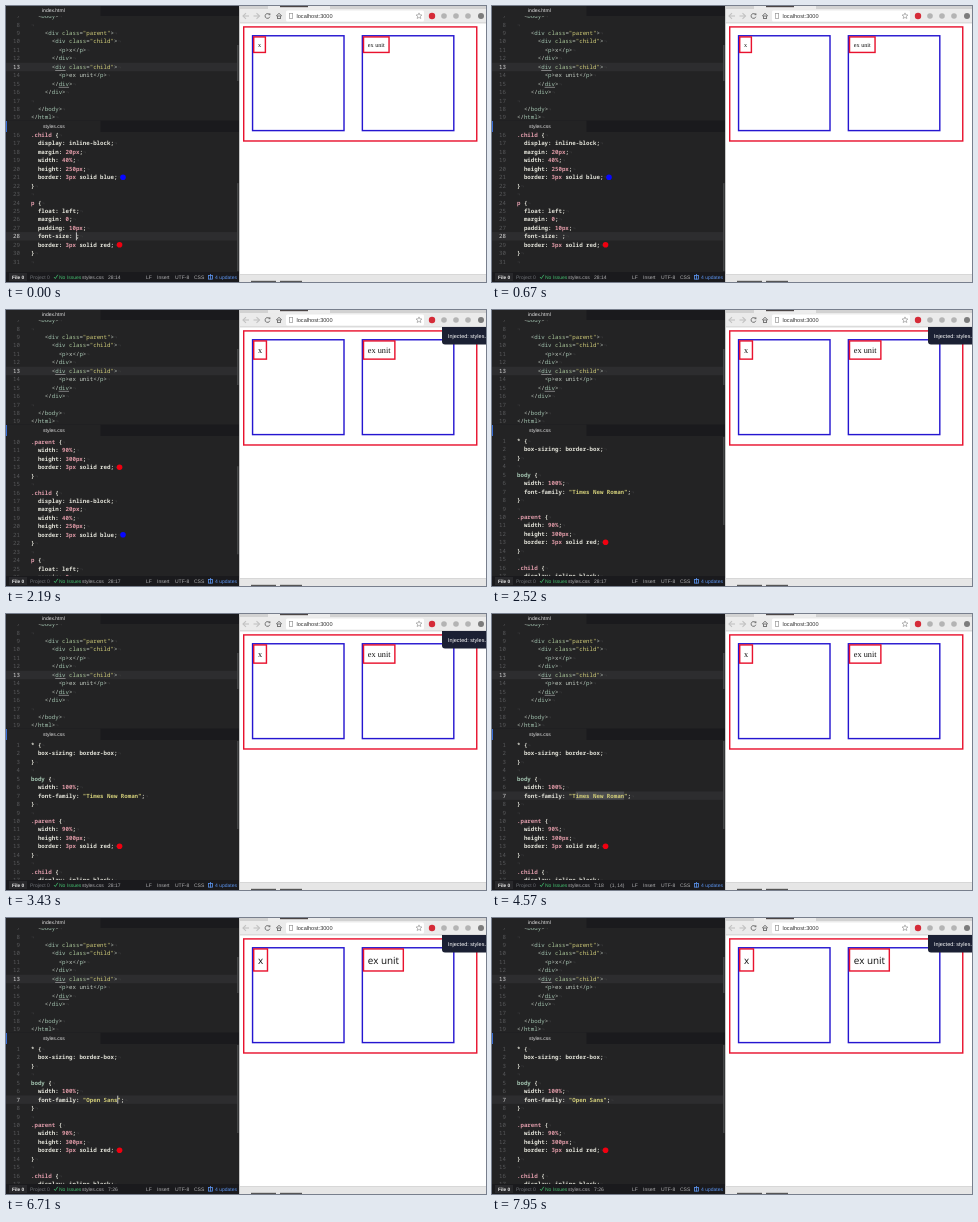
These frames come from a looping animation (480x276 px, 8 s). An HTML page with a canvas:

```html
<!DOCTYPE html>
<html lang="en">
<head>
<meta charset="utf-8">
<style>
  html, body { margin: 0; width: 100%; height: 100%; overflow: hidden; background: #232324; }
  canvas { display: block; width: 480px; height: 276px; }
</style>
</head>
<body>
<canvas width="480" height="276"></canvas>
<script>
const ctx = document.querySelector('canvas').getContext('2d');
ctx.textRendering = 'geometricPrecision';

const LOOP = 8000, ROW = 8.44, COL = 3.456, CODE_X = 25, GUTTER_RIGHT = 14;
const MONO = '5.76px "Noto Sans Mono", monospace';
const SANS = '"Liberation Sans", Arial, sans-serif';
const SERIF = '"Liberation Serif", "Times New Roman", serif';
const C = {
  editor: '#232324', bar: '#1a1a1d', line: '#2d2d2f', selection: '#4a4b4e',
  text: '#e2e2d8', dim: '#58595b', tag: '#a3c4b0', attr: '#a9c598',
  string: '#cfcb78', value: '#dc98a4', selector: '#dc9aa8',
  red: '#e8122e', blue: '#2516d0'
};

// Key moments in ms
const SIZE_KEYS = [700, 900, 1080], SIZE_SAVE = 1750, SIZE_INJECT = 1950;
const SCROLL = [2000, 2430], CLICK = 4150, DRAG = [4250, 4570];
const FONT_START = 4950, FONT_END = 5850, FONT_SAVE = 6150, FONT_INJECT = 6350;
const NOTICE_TIME = 2250;

const html = [
  '  <body>', '', '    <div class="parent">', '      <div class="child">',
  '        <p>x</p>', '      </div>', '      <div class="child">',
  '        <p>ex unit</p>', '      </div>', '    </div>', '', '  </body>', '</html>'
];

const css = (size, family) => `* {
  box-sizing: border-box;
}

body {
  width: 100%;
  font-family: "${family}";
}

.parent {
  width: 90%;
  height: 300px;
  border: 3px solid red;
}

.child {
  display: inline-block;
  margin: 20px;
  width: 40%;
  height: 250px;
  border: 3px solid blue;
}

p {
  float: left;
  margin: 0;
  padding: 10px;
  font-size: ${size};
  border: 3px solid red;
}
`.split('\n');

const clamp = v => Math.max(0, Math.min(1, v));
const progress = (t, [a, b]) => clamp((t - a) / (b - a));

function rect(x, y, w, h, color) {
  ctx.fillStyle = color;
  ctx.fillRect(x, y, w, h);
}

function frame(x, y, w, h, color, width) {
  ctx.strokeStyle = color;
  ctx.lineWidth = width;
  ctx.strokeRect(x + width / 2, y + width / 2, w - width, h - width);
}

function disc(x, y, r, color) {
  ctx.fillStyle = color;
  ctx.beginPath();
  ctx.arc(x, y, r, 0, 7);
  ctx.fill();
}

function rounded(x, y, w, h, radii, color) {
  ctx.fillStyle = color;
  ctx.beginPath();
  ctx.roundRect(x, y, w, h, radii);
  ctx.fill();
}

function stroke(color, width, ...points) {
  ctx.strokeStyle = color;
  ctx.lineWidth = width;
  ctx.beginPath();
  points.forEach(([x, y]) => ctx.lineTo(x, y));
  ctx.stroke();
}

function text(s, x, y, color, font = '5px ' + SANS) {
  ctx.font = font;
  ctx.fillStyle = color;
  ctx.fillText(s, x, y);
}

function clipped(x, y, w, h, draw) {
  ctx.save();
  ctx.beginPath();
  ctx.rect(x, y, w, h);
  ctx.clip();
  draw();
  ctx.restore();
}

const colX = col => CODE_X + (col - 1) * COL;

function htmlColor(token) {
  if (token[0] === '"') return C.string;
  if (token === 'class') return C.attr;
  return /^(div|p|body|html)$/.test(token) ? C.tag : '#c4cdc4';
}

function cssColor(token, line, at) {
  if (token[0] === '"') return C.string;
  if (/^[.p]/.test(line) && at === 0) return C.selector;
  if (line.startsWith('body') && at === 0) return C.tag;
  return /^\d/.test(token) ? C.value : C.text;
}

function codeLine(number, line, y, colorOf, active, weight = '') {
  const label = String(number);
  text(label, GUTTER_RIGHT - label.length * COL, y + 2, active ? '#dcdcdc' : C.dim, MONO);
  for (const m of line.matchAll(/"[^"]*"|[\w.%*-]+|[^\s\w]/g))
    text(m[0], colX(m.index + 1), y + 2, colorOf(m[0], line, m.index), weight + MONO);
  const end = colX(line.length + 1);
  text('¬', end, y + 2, '#424344', MONO);
  const swatch = line.match(/(red|blue);/);
  if (swatch) disc(end + 5.6, y, 2.8, swatch[1] === 'red' ? '#f00010' : '#0808ff');
}

function tabBar(y, height, label, x, modified) {
  rect(0, y, 233, height, C.bar);
  rect(0, y, 94.5, height, C.editor);
  text(label, x, y + height - 3.6, '#e4e4e4');
  if (modified) disc(88, y + height / 2 + .7, 1.2, '#4a86e0');
}

function htmlPane() {
  const y0 = 10.1;
  clipped(0, 10, 233, 104, () => {
    rect(0, 56.8, 231, ROW, C.line);
    html.forEach((line, i) => codeLine(i + 7, line, y0 + i * ROW, htmlColor, i === 6));
    rect(colX(8), 64, 3 * COL, .6, '#b8b8b8');
    rect(colX(9), 80.9, 3 * COL, .6, '#b8b8b8');
    rect(231, 39, 1.6, 36, '#454647');
  });
  tabBar(0, 10, 'index.html', 36, false);
}

function editorState(t) {
  const sizeTyped = SIZE_KEYS.filter(k => t >= k).length;
  const clicked = t >= CLICK, typing = t >= FONT_START;
  const step = (FONT_END - FONT_START) / 8;
  const fontTyped = typing ? Math.min(9, 1 + Math.floor((t - FONT_START) / step)) : 0;
  const dragged = t < DRAG[1] + 50 ? Math.floor(14 * progress(t, DRAG)) : 15;
  let lastInput = 0;
  if (sizeTyped) lastInput = SIZE_KEYS[sizeTyped - 1];
  if (clicked) lastInput = CLICK;
  if (typing) lastInput = Math.min(t, FONT_END);
  return {
    size: '3ex'.slice(0, sizeTyped),
    family: typing ? 'Open Sans'.slice(0, fontTyped) : 'Times New Roman',
    row: clicked ? 7 : 28,
    col: !clicked ? 14 + sizeTyped : typing ? 17 + fontTyped : 32 - dragged,
    selected: clicked && !typing ? dragged : 0,
    modified: sizeTyped > 0 && t < SIZE_SAVE || typing && t < FONT_SAVE,
    caret: (t - lastInput) % 800 < 400
  };
}

function cssPane(t, s) {
  const p = progress(t, SCROLL), scroll = 128.6 * (1 - p * p * (3 - 2 * p));
  const rowY = n => 131 - scroll + (n - 1) * ROW;
  clipped(0, 126, 233, 140, () => {
    const y = rowY(s.row);
    rect(0, y - 4.2, 231, ROW, C.line);
    rect(colX(s.col), y - 4, s.selected * COL, 8, C.selection);
    css(s.size, s.family).forEach((line, i) =>
      codeLine(i + 1, line, rowY(i + 1), cssColor, i + 1 === s.row, '600 '));
    if (s.caret && !s.selected) rect(colX(s.col), y - 4, .8, 8, '#e8e8e8');
    rect(231, 127 + scroll * .39, 1.6, 88, '#454647');
  });
  tabBar(114.5, 11.5, 'styles.css', 37, s.modified);
  rect(0, 115, 1, 11, '#3a70d8');
}

function statusBar(s) {
  rect(0, 266, 233, 10, C.bar);
  const y = 272.8, grey = '#b0b0b2', blue = '#5b93ee';
  rect(3, 267, 18, 8, '#28282b');
  text('File 0', 6, y, '#eeeeee', 'bold 4.8px ' + SANS);
  text('Project 0', 24, y, '#707378');
  stroke('#45c070', .8, [48, 271], [49.3, 272.6], [51.8, 268.8]);
  text('No Issues', 53, y, '#45c070');
  const name = 'styles.css' + (s.modified ? '*' : '');
  text(name, 76, y, grey);
  text(`${s.row}:${s.col}`, s.modified ? 105 : 102, y, grey);
  if (s.selected) text(`(1, ${s.selected})`, 118, y, grey);
  [['LF', 140], ['Insert', 151], ['UTF-8', 169], ['CSS', 188]].forEach(([label, x]) => text(label, x, y, grey));
  frame(202, 269, 5, 4.5, blue, .8);
  stroke(blue, .8, [204.5, 268], [204.5, 273.5]);
  text('4 updates', 209, y, blue);
}

function arrow(x, direction) {
  const tip = x + 3 * direction, tail = x - 3 * direction;
  stroke('#c2c2c2', 1.1, [tail, 10], [tip, 10]);
  stroke('#c2c2c2', 1.1, [x, 7.2], [tip, 10], [x, 12.8]);
}

function toolbar() {
  rect(234, 0, 246, 4, '#d2d2d2');
  rounded(262, -3, 62, 8, 2, '#ececec');
  rect(274, 0, 28, 1.2, '#4a4444');
  rect(234, 3, 246, 14, '#ebebeb');
  rect(234, 16.6, 246, .7, '#c4c4c4');
  rounded(280, 4.5, 138, 11, 1.5, '#ffffff');
  arrow(240, -1);
  arrow(250.5, 1);
  ctx.strokeStyle = '#777';
  ctx.lineWidth = 1;
  ctx.beginPath();
  ctx.arc(261.5, 10, 2.4, .3, 5.4);
  ctx.stroke();
  rect(262.6, 7.4, 1.8, 1.8, '#777');
  stroke('#777', 1, [270, 10.2], [273, 7.3], [276, 10.2]);
  frame(271, 9.5, 4, 3.5, '#777', 1);
  frame(283, 7.2, 4, 5.6, '#999', .7);
  text('localhost:3000', 290.5, 12, '#333', '5.6px ' + SANS);
  const star = Array.from({ length: 11 }, (_, i) => {
    const a = i * Math.PI / 5 - Math.PI / 2, r = i % 2 ? 1.4 : 3.1;
    return [413 + r * Math.cos(a), 10 + r * Math.sin(a)];
  });
  stroke('#999', .7, ...star);
  disc(426, 10, 3.2, '#d52b38');
  [438, 450, 462].forEach(x => disc(x, 10, 2.8, '#b4b4b4'));
  disc(475, 10, 3, '#7c7c7c');
}

// The page is laid out in CSS pixels and shown at a reduced scale.
function page(t) {
  const SCALE = .385, BORDER = 3, INK = 3.7, PADDING = 10, MARGIN = 20;
  rect(233, 0, 247, 276, '#ffffff');
  rect(233, 0, .8, 276, '#bcbcbc');
  const enlarged = t >= SIZE_INJECT, sans = t >= FONT_INJECT;
  const family = sans ? '"Open Sans", sans-serif' : SERIF;
  const size = enlarged ? 16 * 3 * (sans ? .535 : .448) : 16;
  const lineHeight = Math.round(size * (sans ? 1.362 : 1.149));
  const ascent = Math.round(size * (sans ? 1.069 : .891));
  const width = 609, childWidth = .4 * (width - 2 * BORDER), childTop = BORDER + MARGIN;

  ctx.save();
  ctx.translate(237, 20.2);
  ctx.scale(SCALE, SCALE);
  frame(0, 0, width, 300, C.red, INK);
  ['x', 'ex unit'].forEach((label, i) => {
    const x = childTop + i * (childWidth + 2 * MARGIN + 4), edge = PADDING + BORDER;
    frame(x, childTop, childWidth, 250, C.blue, INK);
    ctx.translate(x + BORDER, childTop + BORDER);
    text(label, edge, edge + ascent, '#111', `${size}px ${family}`);
    frame(0, 0, ctx.measureText(label).width + 2 * edge, lineHeight + 2 * edge, C.red, INK);
    ctx.translate(-x - BORDER, -childTop - BORDER);
  });
  ctx.restore();

  rect(234, 268, 246, .8, '#c8c8c8');
  rect(234, 268.8, 246, 7.2, '#e6e6e6');
  rect(245, 274.8, 25, 1.2, '#555');
  rect(274, 274.8, 22, 1.2, '#555');
}

function notice(t) {
  const start = t >= FONT_INJECT ? FONT_INJECT : SIZE_INJECT;
  const age = t - start;
  if (age < 0 || age > NOTICE_TIME) return;
  ctx.globalAlpha = clamp((NOTICE_TIME - age) / 150);
  rounded(436, 17, 50, 17.5, [0, 0, 0, 3], '#1b2033');
  text('Injected: styles.css', 442, 27.6, '#ffffff', '5.5px ' + SANS);
  ctx.globalAlpha = 1;
}

function draw(now) {
  const t = now % LOOP, state = editorState(t);
  rect(0, 0, 233, 276, C.editor);
  htmlPane();
  cssPane(t, state);
  statusBar(state);
  page(t);
  toolbar();
  notice(t);
  requestAnimationFrame(draw);
}
requestAnimationFrame(draw);
</script>
</body>
</html>
```
